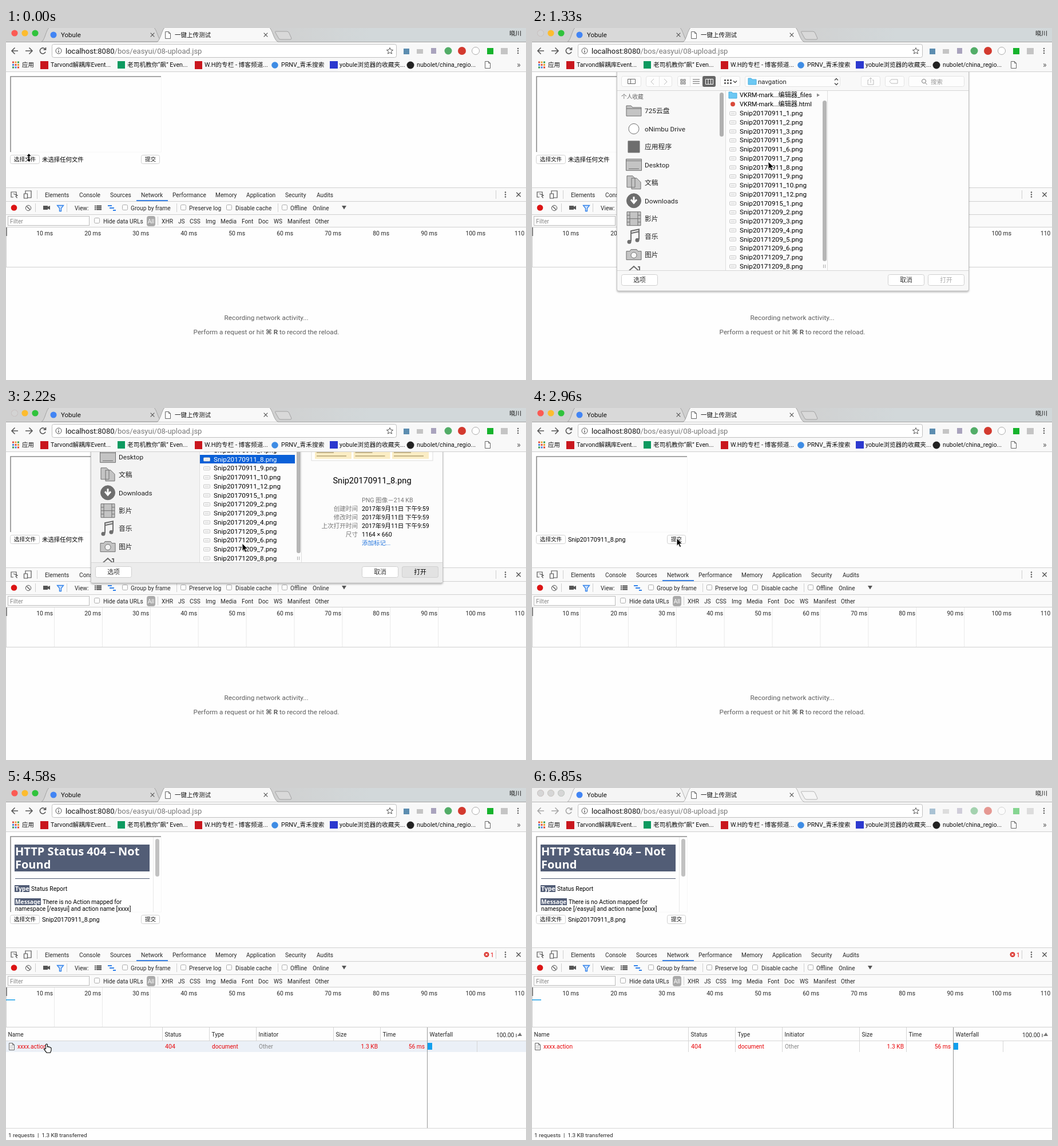
An HTML page for the animation above (6960 ms loop, 909x616 px).

```html
<!DOCTYPE html>
<html lang="zh">
<head>
<meta charset="utf-8">
<style>
html, body { margin: 0; width: 100%; height: 100%; overflow: hidden; background: #fefefe; }
svg { display: block; --strip: url(#stripTint); --tab: #d9d9d9; --edge: #a3a3a3; }
svg.idle { --strip: #f0f0f0; --tab: #f5f5f5; --edge: #b5b5b5; }
svg.idle .fade { opacity: .5; }
text { font-family: Roboto, "Noto Sans CJK SC", "Noto Sans CJK", sans-serif; white-space: pre; }
.page { font-family: "Noto Sans", sans-serif; font-weight: 700; }
.key { font-family: "DejaVu Sans", sans-serif; font-weight: 700; }
</style>
</head>
<body>
<svg id="stage" width="909" height="616" viewBox="0 0 909 616"></svg>
<script>
const LOOP = 6960, STEP = 148;
const stage = document.getElementById('stage');

// Drawing helpers; text is placed by its vertical centre.
const text = (x, y, s, size = 10.2, fill = '#262626', more = '') =>
  `<text x="${x}" y="${y + size * .36}" font-size="${size}" fill="${fill}" ${more}>${s}</text>`;
const box = (x, y, w, h, fill, stroke = 'none', r = 0) =>
  `<rect x="${x}" y="${y}" width="${w}" height="${h}" fill="${fill}" stroke="${stroke}" rx="${r}"/>`;
const dot = (x, y, r, fill, stroke = 'none') =>
  `<circle cx="${x}" cy="${y}" r="${r}" fill="${fill}" stroke="${stroke}"/>`;
const path = (d, stroke = '#555', fill = 'none', w = 1, more = '') =>
  `<path d="${d}" stroke="${stroke}" fill="${fill}" stroke-width="${w}" ${more}/>`;
const group = (id, s, more = '') => `<g id="${id}" ${more}>${s}</g>`;
const at = (x, y, s) => `<g transform="translate(${x} ${y})">${s}</g>`;
const range = (n, f) => Array.from({ length: n }, (_, i) => f(i)).join('');
const RIGHT = 'text-anchor="end"', MID = 'text-anchor="middle"';
const cross = (x, y, r, c = '#555', w = 1.2) => path(`M${x - r} ${y - r}l${2 * r} ${2 * r}m0 ${-2 * r}l${-2 * r} ${2 * r}`, c, 'none', w);
const button = (x, y, w, h, s, size, fill = '#fff', color = '#111') =>
  box(x + .5, y + .5, w - 1, h - 1, fill, '#d0d0d0', 3) + text(x + w / 2, y + h / 2, s, size, color, MID);
const sheetIcon = path('M.5 .5h6l3 3v9h-9zM6.5 .5v3h3', '#666', '#fff');
const dots = (x, y) => [-4, 0, 4].map(d => dot(x, y + d, 1.2, '#555')).join('');

function browser() {
  const exts = box(695, 36, 10, 10, '#5c8db0') + box(718, 37, 11, 8, '#c4c4c4') + box(743, 35, 9, 10, '#a9a3bd') +
    dot(773, 40, 6.5, '#53ad68') + dot(797, 40, 7, '#d33a2f') + dot(821, 40, 6.5, '#fff', '#aaa') +
    box(841, 35, 11, 11, '#16b32c') + box(865, 35, 12, 11, '#c4c4c4');
  const marks = [
    [78, 'Tarvond解耦库Event...'], [212, '老司机教你“飙” Even...'], [347, 'W.H的专栏 - 博客频道...'],
    [481, 'PRNV_青禾搜索'], [583, 'yobule浏览器的收藏夹...'], [718, 'nubolet/china_regio...']];
  return box(0, 0, 909, 25, 'var(--strip)') +
    path('M62 24C68 22 70 2 76 -1H258C264 2 266 22 273 24Z', 'var(--edge)', 'var(--tab)') +
    path('M471 6h20q3 0 4 3l4 9q0 2-2 2h-17q-3 0-4-3l-5-9q-1-2 0-2z', 'var(--edge)', 'var(--tab)') +
    path('M0 24.5H909', 'var(--edge)') +
    path('M264 24.5C270 22 272 2 278 -1H460C466 2 468 22 476 24.5', 'var(--edge)', '#f8f8f8') +
    box(0, 25, 909, 52, '#f8f8f8') + path('M0 76.5H909', '#cfcfcf') +
    dot(15, 9, 5.6, '#fb5a54') + dot(33, 9, 5.6, '#fdbc2f') + dot(51, 9, 5.6, '#30c33c') +
    group('redOff', dot(15, 9, 5.6, '#d3d3d3', '#c6c6c6')) +
    group('lightsOff', [15, 33, 51].map(x => dot(x, 9, 5.6, '#d6d6d6', '#c6c6c6')).join('')) +
    dot(83, 12, 5.5, '#4285f4') + text(96, 12, 'Yobule', 11.5, '#111') + cross(256, 12, 3.3) +
    at(278, 6, sheetIcon) + text(295, 12, '一键上传测试', 10.5, '#111') + cross(454, 12, 3.3) +
    text(880, 9, '晓川', 10.5, '#111') +
    group('nav', path('M21 40H10m5.5-5.5L10 40l5.5 5.5M34 40h12m-5.5-5.5L46 40l-5.5 5.5M68.7 37.5a5 5 0 1 0 .3 4.2M69.5 34v4h-4', '#555', 'none', 1.6), 'class="fade"') +
    box(80.5, 28.5, 602, 23, '#fff', '#bfbfbf', 3) +
    dot(92, 40, 5, 'none', '#555') + path('M92 37v1.3m0 1.2v3.5', '#555', 'none', 1.4) +
    text(104, 40, 'localhost:8080<tspan fill="#777">/bos/easyui/08-upload.jsp</tspan>', 13, '#111') +
    path('M671 34.5l1.6 3.7 4 .3-3.1 2.6 1 4-3.5-2.2-3.5 2.2 1-4-3.1-2.6 4-.3z', '#555') +
    `<g class="fade">${exts}</g>` + dots(895, 40) +
    range(9, i => box(11 + i % 3 * 4.5, 58.5 + (i / 3 | 0) * 4.5, 3, 3, ['#e14b3b', '#e8a42c', '#3e9e59', '#4a82dc'][i % 4])) +
    text(28, 64.5, '应用', 10.4, '#111') +
    box(60, 58, 14, 14, '#c9161d') + box(195, 58, 13, 13, '#0d9a60') + box(330, 58, 13, 14, '#c9161d') +
    dot(470, 65, 5.8, '#3e8ce4') + box(566, 58, 14, 13, '#2c39cf') + dot(707, 65, 6.5, '#222') +
    marks.map(([x, s]) => text(x, 64.5, s, 10.7, '#111')).join('') +
    at(837, 58, sheetIcon) + text(893, 64, '»', 14, '#555');
}

function page() {
  const error = box(15, 99, 236, 47, '#525d76') +
    ['HTTP Status 404 – Not', 'Found'].map((s, i) => text(16, 111 + 23 * i, s, 20, '#fff', 'class="page"')).join('') +
    box(16, 158, 235, 1, '#525d76') +
    box(15, 170, 26, 12, '#525d76') + text(16, 176, 'Type', 10.5, '#fff', 'class="page"') +
    text(44, 176, 'Status Report', 10.4, '#000') +
    box(15, 193, 46, 12, '#525d76') + text(16, 199, 'Message', 10.2, '#fff', 'class="page"') +
    text(64, 199, 'There is no Action mapped for', 10.3, '#000') +
    text(16, 211, 'namespace [/easyui] and action name [xxxx]', 10.3, '#000') +
    box(257, 86, 1, 131, '#e8e8e8') + box(261, 89, 7, 66, '#c1c1c1', 'none', 3.5);
  return path('M271.5 86V217H8', '#f6f6f6') + path('M8 217V85H271', '#8b8b8b', 'none', 1.6) + group('error', error) +
    button(7, 222, 52, 16, '选择文件', 9.6) + group('pickDown', button(7, 222, 52, 16, '选择文件', 9.6, '#2274f0')) +
    group('noFile', text(63, 230, '未选择任何文件', 10.4, '#000')) +
    group('hasFile', text(63, 230, 'Snip20170911_8.png', 10.7, '#000')) +
    button(236, 222, 33, 16, '提交', 9.6) + group('sendDown', button(236, 222, 33, 16, '提交', 9.6, '#2274f0'));
}

function devtools() {
  const tabs = { 68: 'Elements', 128: 'Console', 182: 'Sources', 236: 'Network', 291: 'Performance', 366: 'Memory', 420: 'Application', 488: 'Security', 543: 'Audits' };
  const tools = { 120: 'View:', 218: 'Group by frame', 320: 'Preserve log', 401: 'Disable cache', 497: 'Offline', 536: 'Online' };
  const kinds = { 272: 'XHR', 301: 'JS', 321: 'CSS', 349: 'Img', 375: 'Media', 412: 'Font', 441: 'Doc', 468: 'WS', 492: 'Manifest', 540: 'Other' };
  const row = (items, y) => Object.entries(items).map(([x, s]) => text(x, y, s)).join('');
  const check = (x, y) => box(x + .5, y + .5, 9, 9, '#fff', '#aaa', 2);
  const cols = [0, 274, 356, 438, 573, 655, 737];
  const heads = ['Name', 'Status', 'Type', 'Initiator', 'Size', 'Time', 'Waterfall'];
  const red = '#e8060a';
  const table = box(0, 370, 16, 1.5, '#1a9fe8') +
    path('M0 442.5H909M0 595.5H909' + cols.slice(1).map(x => `M${x - .5} 419V462`).join(''), '#d6d6d6') +
    group('rowHover', box(0, 443, 909, 19, '#ebf0f7')) +
    path('M736.5 419V595', '#999') + path('M823.5 443V462', '#d6d6d6') +
    heads.map((s, i) => text(cols[i] + 3.5, 431, s)).join('') + text(857, 432, '100.00 ı') + path('M894 434h8l-3.5-6z', 'none', '#777') +
    at(5, 446, sheetIcon + path('M2 5h6m-6 2.5h6m-6 2.5h6', '#bbb')) +
    text(20, 452, 'xxxx.action', 10.2, red) + text(278, 452, '404', 10.6, red) + text(360, 452, 'document', 10.2, red) +
    text(442, 452, 'Other', 10.2, '#888') + text(650, 452, '1.3 KB', 10.2, red, RIGHT) + text(732, 452, '56 ms', 10.2, red, RIGHT) +
    box(737, 446, 8, 12, '#12a0ee') + text(4, 607, '1 requests  |  1.3 KB transferred', 9.9) +
    dot(840, 291.5, 4.5, '#dc3a34') + cross(840, 291.5, 1.6, '#fff') + text(847, 292, '1', 10.2, red);
  const empty = text(455, 507, 'Recording network activity...', 11.8, '#5c5c5c', MID) +
    text(455, 531.5, 'Perform a request or hit <tspan class="key">⌘</tspan><tspan font-weight="700"> R</tspan> to record the reload.', 11.7, '#5c5c5c', MID);
  const lines = (id, n) => group(id, path(range(n, i => `M${84.5 + i * 83.9} 349V419`), '#e9e9e9'));
  return box(0, 279, 909, 70, '#fafafa') + path('M0 279.5H909M0 303.5H909M0 326.5H909M0 348.5H909', '#d0d0d0') +
    path('M54.5 284v15M856.5 284v15M51.5 307v15M106.5 307v15M298.5 307v15M475.5 307v15M265.5 330v15', '#d0d0d0') +
    path('M18 293v-6h-9v9h4M13 290l7 3-3 1.5 2.5 3M34 290v-5h10v12h-6M31.5 290h6v8h-6z', '#555', 'none', 1.2) +
    row(tabs, 292) + box(228, 301, 55, 2, '#3a82e4') + dots(873, 291.5) + cross(896, 291.5, 3.7, '#555', 1.4) +
    dot(14, 314.5, 5.3, '#dc1414') + dot(39, 315, 4.7, 'none', '#555') + path('M36 312l6 6', '#555', 'none', 1.3) +
    path('M65 311h8v2l4-2v7l-4-2v2h-8z', 'none', '#555') + path('M89.5 310.5h11l-4 5v5h-3v-5z', '#2f80ea', '#cfe2fb', 1.3) +
    path('M155 311.5h2m1 0h9M155 314.5h2m1 0h9M155 317.5h2m1 0h9', '#444', 'none', 1.8) +
    path('M178 311h7m-4 4h8m-2 4h5', '#2f80ea', 'none', 2) +
    row(tools, 315) + path('M587 311h8l-4 6.5z', 'none', '#555') +
    [203, 305, 385, 482].map(x => check(x, 309)).join('') + check(154, 332) +
    box(3.5, 329.5, 142, 16, '#fff', '#bbb') + text(7, 338, 'Filter', 10.2, '#888') + text(170, 338, 'Hide data URLs') +
    box(246, 329, 15, 18, '#a9a9a9', 'none', 4) + text(253.5, 338, 'All', 10.2, '#fff', MID) + row(kinds, 338) +
    lines('gridAll', 9) + lines('gridLeft', 3) +
    path('M.5 349V419M0 418.5H909', '#d0d0d0') + box(0, 349, 2, 15, '#888') +
    range(10, i => text(82 + i * 84, 359, (i + 1) * 10 + ' ms', 10.4, '#262626', RIGHT)) + text(889, 359, '110', 10.2) +
    group('empty', empty) + group('table', table);
}

function sidebar() {
  const folder = 'M-13-9h8l3 3h15v15h-26zM-13-4h26';
  const items = [
    ['725云盘', folder], ['oNimbu Drive', 'M-9 0a9 9 0 1 0 18 0a9 9 0 1 0-18 0'], ['应用程序', 'M-10-10h20v20h-20z'],
    ['Desktop', 'M-13.5-10h27v20h-27zM-13.5-7h27M-9 7h18'], ['文稿', 'M-12-12h10l4 4v16h-14zM-4-8h9l7 7v12h-16z'],
    ['Downloads', 'M-12.5 0a12.5 12.5 0 1 0 25 0a12.5 12.5 0 1 0-25 0'], ['影片', 'M-12-12h24v24h-24zM-7-12v24M7-12v24M-7 0h14M-12-6h5m-5 6h5m-5 6h5M7-6h5m-5 6h5m-5 6h5'],
    ['音乐', 'M-5 8V-10L9-13V5M-5-6L9-9'], ['图片', 'M-13-6h6l2-3h10l2 3h6v15h-26zM-5 1a5 5 0 1 0 10 0a5 5 0 1 0-10 0'],
    ['sutaolin', 'M-12 0L0-11L12 0M-8-2v13h5v-8h6v8h5v-13M7-10h3v6'], ['Related U', folder]];
  return text(156, 121, '个人收藏', 9.7, '#666', 'font-weight="500"') + items.map(([s, d], i) => {
    const open = i === 7 || i === 9;
    const fill = open ? 'none' : i === 1 ? '#fff' : i === 2 || i === 5 ? '#6e6e6e' : '#c4c4c4';
    const extra = i === 5 ? path('M0-7v9m-5-4l5 6 5-6', '#fff', 'none', 3) : i === 7 ? dot(-8, 9, 3.5, '#6e6e6e') + dot(6, 6, 3.5, '#6e6e6e') : '';
    return at(178, 145 + i * 31.45, path(d, '#6e6e6e', fill, open ? 2 : 1) + extra + text(19, 0, s, 11.8, '#222'));
  }).join('');
}

function sheet() {
  const ids = ['0911_1', '0911_2', '0911_3', '0911_5', '0911_6', '0911_7', '0911_8', '0911_9', '0911_10', '0911_12', '0915_1'];
  const names = ids.map(s => 'Snip2017' + s).concat(Array.from({ length: 7 }, (_, i) => 'Snip20171209_' + (i + 2))).map(s => s + '.png');
  const rowY = i => 117.5 + i * 15.74;
  const thumb = (x, y) => box(x - 4.5, y - 2.5, 11, 6, '#fafafa', '#c6c6c6', 1) + path(`M${x - 2.5} ${y + .5}h7`, '#cfcfcf');
  const folder = (x, y) => path(`M${x} ${y}h5l2 2h7v9h-14z`, '#48aee0', '#6cc8f3');
  const files = folder(344, 112) + text(363, rowY(0), 'VKRM-mark...编辑器_files', 11.1, '#000') + path('M498 114.5v6l5-3z', 'none', '#888') +
    dot(351, rowY(1), 4, '#d9493a') + text(363, rowY(1), 'VKRM-mark...编辑器.html', 11.1, '#000') +
    names.map((s, i) => thumb(350, rowY(i + 2)) + text(363, rowY(i + 2), s, 11.75, '#000')).join('') +
    box(508, 127, 7, 281, '#b6b6b6', 'none', 3.5);
  const facts = [['创建时间', '2017年9月11日 下午9:59'], ['修改时间', '2017年9月11日 下午9:59'], ['上次打开时间', '2017年9月11日 下午9:59'], ['尺寸', '1164 × 660']];
  const preview = box(534, 126, 212, 120, '#fff', '#ddd') +
    range(9, i => {
      const x = 540 + i % 3 * 67.5, y = 130 + (i / 3 | 0) * 39;
      return box(x, y, 64, 35, '#fbedc4') + path(`M${x + 3} ${y + 24}h30m-30 6h52`, '#8d7a4a');
    }) +
    text(640, 281, 'Snip20170911_8.png', 14.6, '#000', MID) + text(622, 315, 'PNG 图像－214 KB', 10.6, '#777') +
    facts.map(([k, v], i) => text(615, 330.5 + i * 15, k, 10.6, '#777', RIGHT) + text(622, 330.5 + i * 15, v, 10.6, '#000')).join('') +
    text(622, 390.5, '添加标记...', 10.5, '#2375dd');
  const pill = (x, w) => box(x + .5, 84.5, w - 1, 18, '#fdfdfd', '#e4e4e4', 3);
  const top = pill(156, 35) + pill(199, 46) + pill(254, 67) + pill(329, 35) + pill(372, 167) + pill(575, 34) + pill(617, 34) + pill(658, 98) +
    box(298, 84, 23, 19, '#666', 'none', 3) + path('M222.5 85v18M276.5 85v18', '#e4e4e4') +
    path('M167.5 89.5h13v8h-13zM172.5 89.5v8M281 90h12m-12 3.5h12m-12 3.5h12', '#666') +
    path('M213 89l-5 5 5 5M231 89l5 5-5 5M589 91h-2v8h10v-8h-2M592 96v-9m-2 2l2-2 2 2M628 90h11v7h-11l-3-3.5z', '#bbb') +
    path('M303.5 89.5h13v9h-13zm4.5 0v9m4.5-9v9', '#fff') +
    range(4, i => box(260 + i % 2 * 5, 90 + (i >> 1) * 5, 3, 3, 'none', '#666')) +
    range(6, i => box(336 + i % 3 * 5, 90 + (i / 3 | 0) * 5, 3, 3, '#666')) + path('M352 92.5l3 3 3-3M529 91.5l3-3 3 3m-6 5l3 3 3-3', '#444', 'none', 1.3) +
    folder(378, 88) + text(395, 94, 'navgation', 11.4, '#222') +
    dot(685, 93, 3.5, 'none', '#777') + path('M687.5 96l3 3', '#777') + text(697, 94, '搜索', 10.5, '#999');
  const foot = (x, s) => button(x, 431, 64, 20, s, 10.8, '#fff', '#333');
  const active = box(149, 110, 189, 314, '#f3f3f3') + box(149, 425, 614, 34, '#ececec');
  return box(148.5, 60, 615, 400, '#f8f8f8', '#c4c4c4', 3) + top +
    box(339, 110, 424, 314, '#fcfcfc') + group('active', active) +
    path('M149 109.5H763M149 424.5H763', '#d6d6d6') + path('M338.5 110V424M516.5 110V424', '#dedede') +
    group('side', sidebar()) + path('M509.5 414v6m3-6v6', '#aaa') + group('files', files + box(328, 113, 7, 77, '#b0b0b0', 'none', 3.5)) +
    group('chosen', box(339, 236, 166, 15, '#0a60d8') + thumb(350, rowY(8)) + text(363, rowY(8), names[6], 11.75, '#fff')) +
    group('preview', preview) +
    foot(156, '选项') + foot(622, '取消') + button(692, 431, 64, 20, '打开', 10.8, '#fff', '#aaa') +
    group('ready', button(692, 431, 64, 20, '打开', 10.8, '#e2e2e2', '#000')) + group('waiting', box(150, 427, 612, 30, '#f8f8f8'), 'opacity=".6"');
}

const cursors =
  group('resize', path('M0-7l3.5 4h-2.5v6h2.5l-3.5 4-3.5-4h2.5v-6h-2.5z', '#fff', '#000', 1, 'paint-order="stroke"')) +
  group('arrow', path('M0 0v13.5l3-3 2.3 5 2.5-1-2.3-4.8h4.5z', '#fff', '#000')) +
  group('hand', path('M3.5 9V2q1.5-2 3 0v4q2-1 2.5 .5q2-.6 2.5 .7q1.7 0 1.5 2v3l-1.5 4h-6.5l-4.5-6q0-2 2.5-.5z', '#000', '#fff', 1.1));

stage.innerHTML = `<defs><clipPath id="below"><rect y="77" width="909" height="539"/></clipPath>
  <clipPath id="sideBox"><rect x="149" y="110" width="189" height="314"/></clipPath>
  <linearGradient id="stripTint"><stop offset=".5" stop-color="#d0d0d0"/><stop offset=".7" stop-color="#d2d8da"/></linearGradient></defs>` +
  page() + devtools() + browser() +
  `<g clip-path="url(#below)">${group('sheet', sheet(), 'style="filter:drop-shadow(0 2px 1.5px #0004)"')}</g>` +
  group('tip', box(85.5, 452.5, 216, 21, '#f5f5f5', '#c4c4c4') + text(92, 463, 'http://localhost:8080/bos/easyui/xxxx.action', 10)) +
  group('cursor', cursors);

const $ = id => document.getElementById(id);
const side = $('side');
side.outerHTML = `<g clip-path="url(#sideBox)">${side.outerHTML}</g>`;

// Pointer path: step, x, y
const track = [[0, 40, 227], [1, 40, 227], [4, 68, 237], [6, 68, 237], [9, 413, 234], [15, 413, 237], [20, 253, 228], [26, 253, 228],
  [31, 66, 447], [34, 48, 451], [37, 48, 451], [38, 90, 450], [39, 90, 450], [45, 915, 620], [48, 915, 620]];
const smooth = p => (p = Math.min(1, Math.max(0, p)), p * p * (3 - 2 * p));
const move = (el, x, y) => el.setAttribute('transform', `translate(${x} ${y})`);

function draw(t) {
  const n = Math.floor(t / STEP + .06), now = n * STEP;
  const idle = t >= 6850, sent = n >= 25, onRow = n >= 31 && n < 40, picked = n >= 10;
  const down = smooth((now - 690) / 500) - smooth((now - 1990) / 530);
  const visible = {
    redOff: n >= 2 && n < 18, lightsOff: idle, pickDown: n >= 1 && n < 8, noFile: n < 17, hasFile: n >= 17,
    sendDown: n === 24, error: sent, table: sent, empty: !sent, gridAll: n >= 13 && n < 25, gridLeft: n >= 31 && !idle,
    rowHover: onRow, tip: n === 38 || n === 39, sheet: down > .001, files: n >= 8, chosen: picked, preview: n >= 11,
    active: picked, ready: picked, waiting: n < 8, resize: n < 1, hand: onRow, arrow: n >= 1 && !onRow, cursor: !idle
  };
  for (const id in visible) $(id).style.display = visible[id] ? '' : 'none';
  stage.classList.toggle('idle', idle);
  move($('sheet'), 0, Math.round(383 * (down - 1)));
  move($('side'), 0, n < 8 ? -34 : 0);
  const k = track.findIndex(p => p[0] > n), [a, ax, ay] = track[k - 1], [b, bx, by] = track[k];
  const f = (n - a) / (b - a);
  move($('cursor'), ax + (bx - ax) * f, ay + (by - ay) * f);
}

const start = performance.now();
function tick() {
  draw((performance.now() - start) % LOOP);
  requestAnimationFrame(tick);
}
tick();
</script>
</body>
</html>
```
